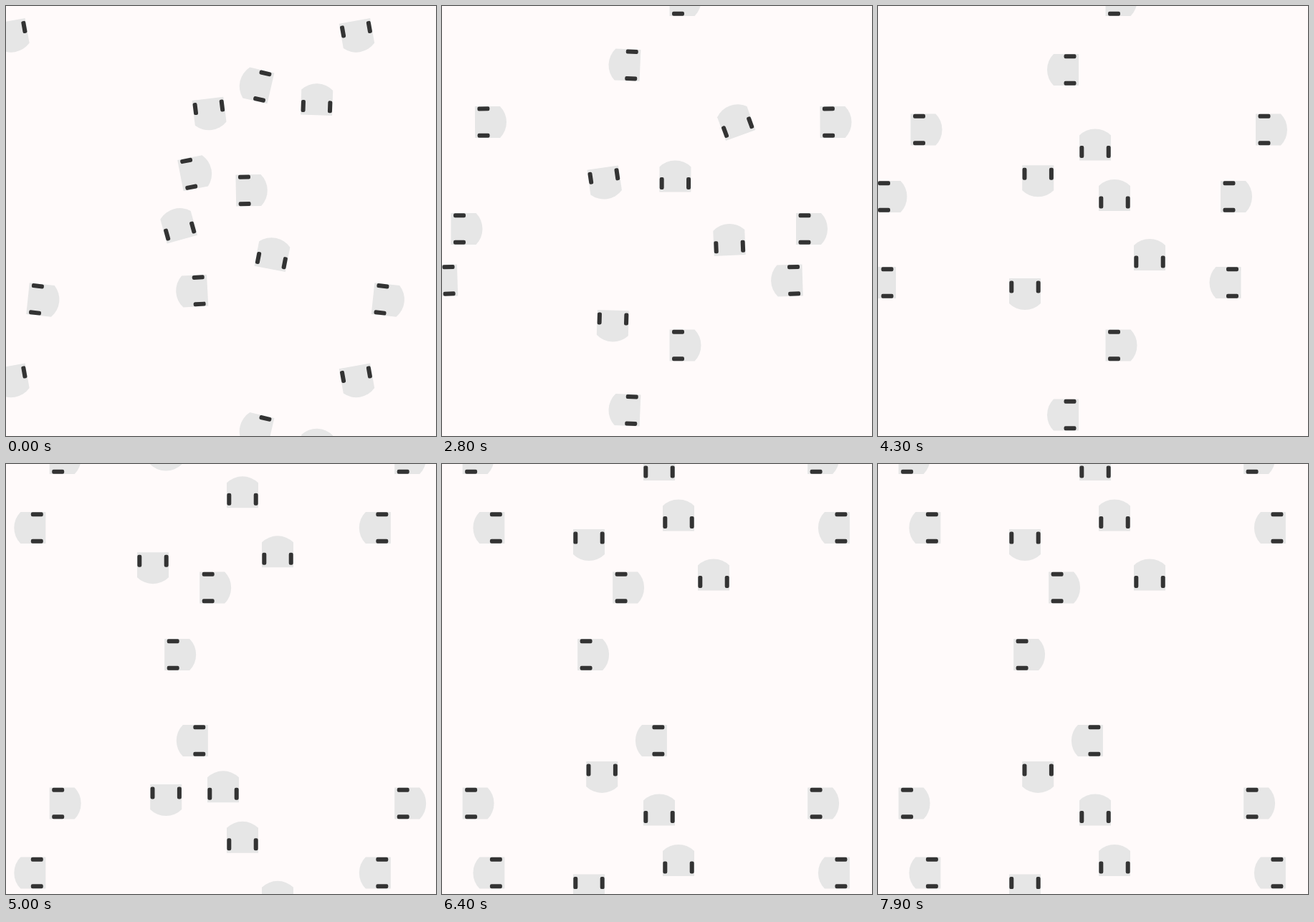
Write an HTML page with a canvas that moves like this. It is 600 by 600 pixels and loops after 8000 ms.

```html
<!DOCTYPE html>
<html lang="en">
<head>
<meta charset="utf-8">
<title>Wrapping carts</title>
<style>
  html, body { margin: 0; width: 100%; height: 100%; overflow: hidden; background: #fffafa; }
  canvas { display: block; }
</style>
</head>
<body>
<canvas id="stage" width="600" height="600"></canvas>
<script>
const ctx = document.getElementById('stage').getContext('2d');
const SIZE = 600, REACH = 35;
const WORLD = 481.5, CRUISE = WORLD / 15; // one lap takes 15 steps
const STEP_MS = 100, STEPS = 80;
const TIMES = [0, 16, 28, 43];

// First heading in degrees, then the unwrapped key points passed at TIMES.
const CARTS = [
  [6, [52.4, 410.4], [435.8, 473.5], [821, 473.5], [1302.5, 473.5]],
  [-11, [265, 232.4], [655.4, 174], [1031, 162], [1512, 172.5]],
  [-1, [342.8, 257.2], [777, 289.2], [997.5, 311], [1463, 266]],
  [193, [348, 109.9], [76.8, 111.3], [-227, 82.1], [-705, 89]],
  [177, [259.2, 397.8], [-118.2, 363.7], [-481.9, 383.1], [-960, 386]],
  [80, [8.7, 42.5], [125.2, 396.2], [227.3, 728.9], [223.2, 1207.3]],
  [83, [284.1, 151.2], [234.4, 240.6], [238.2, 446.5], [205, 883.5]],
  [-105.5, [240, 304.4], [58.5, -62.3], [-72.3, -321.7], [-178.5, -769.5]],
  [-79, [372.3, 345.3], [326.7, 25.5], [325.4, -244], [330, -699]],
  [-88, [433.8, 130.2], [413.7, -276.3], [400.8, -637], [379, -1097.5]]
];

const mod = (v, m) => ((v % m) + m) % m;

// A cart turns through the mean direction of the legs it joins,
// averages their pace, and finally cruises along the nearest axis.
function plan([face, ...points]) {
  const legs = points.slice(1).map(([x, y], i) => {
    const dx = x - points[i][0], dy = y - points[i][1];
    return { angle: Math.atan2(dy, dx), pace: Math.hypot(dx, dy) / (TIMES[i + 1] - TIMES[i]) };
  });
  const quarter = Math.PI / 2;
  const axis = Math.round(legs.at(-1).angle / quarter) * quarter;
  return points.map(([x, y], i) => {
    const before = legs[i - 1], after = legs[i];
    let angle, pace;
    if (!before) [angle, pace] = [face * Math.PI / 180, after.pace];
    else if (!after) [angle, pace] = [axis, CRUISE];
    else {
      const turn = after.angle - before.angle;
      angle = before.angle + Math.atan2(Math.sin(turn), Math.cos(turn)) / 2;
      pace = (before.pace + after.pace) / 2;
    }
    return { x, y, vx: pace * Math.cos(angle), vy: pace * Math.sin(angle) };
  });
}
const tracks = CARTS.map(plan);

// Cubic Hermite value and slope.
function hermite(p, v, q, w, d, u) {
  const m = v * d, n = w * d, c = q - p;
  const a = m + n - 2 * c, b = 3 * c - 2 * m - n;
  return [((a * u + b) * u + m) * u + p, (3 * a * u + 2 * b) * u + m];
}

function pose(track, step) {
  const next = TIMES.findIndex(t => t > step);
  if (next < 0) {
    const { x, y, vx, vy } = track.at(-1), d = step - TIMES.at(-1);
    return [x + vx * d, y + vy * d, Math.atan2(vy, vx)];
  }
  const p = track[next - 1], q = track[next];
  const d = TIMES[next] - TIMES[next - 1], u = (step - TIMES[next - 1]) / d;
  const [x, dx] = hermite(p.x, p.vx, q.x, q.vx, d, u);
  const [y, dy] = hermite(p.y, p.vy, q.y, q.vy, d, u);
  return [x, y, Math.atan2(dy, dx)];
}

const body = new Path2D('M-22-22H13A31.4 31.4 0 0 1 13 22H-22Z');
const wheels = new Path2D();
for (const y of [-18.7, 18.7]) wheels.roundRect(-18.5, y - 3, 17, 6, 2.2);

function drawCart(x, y, angle) {
  ctx.save();
  ctx.translate(x, y);
  ctx.rotate(angle);
  ctx.fillStyle = '#e6e6e6';
  ctx.fill(body);
  ctx.fillStyle = '#333';
  ctx.fill(wheels);
  ctx.restore();
}

function draw(step) {
  ctx.fillStyle = '#fffafa';
  ctx.fillRect(0, 0, SIZE, SIZE);
  for (const track of tracks) {
    const [x, y, angle] = pose(track, step);
    for (let cx = mod(x, WORLD) - WORLD; cx < SIZE + REACH; cx += WORLD)
      for (let cy = mod(y, WORLD) - WORLD; cy < SIZE + REACH; cy += WORLD)
        drawCart(cx, cy, angle);
  }
}

const start = performance.now();
function tick() {
  draw(Math.floor((performance.now() - start) / STEP_MS) % STEPS);
  requestAnimationFrame(tick);
}
tick();
</script>
</body>
</html>
```
